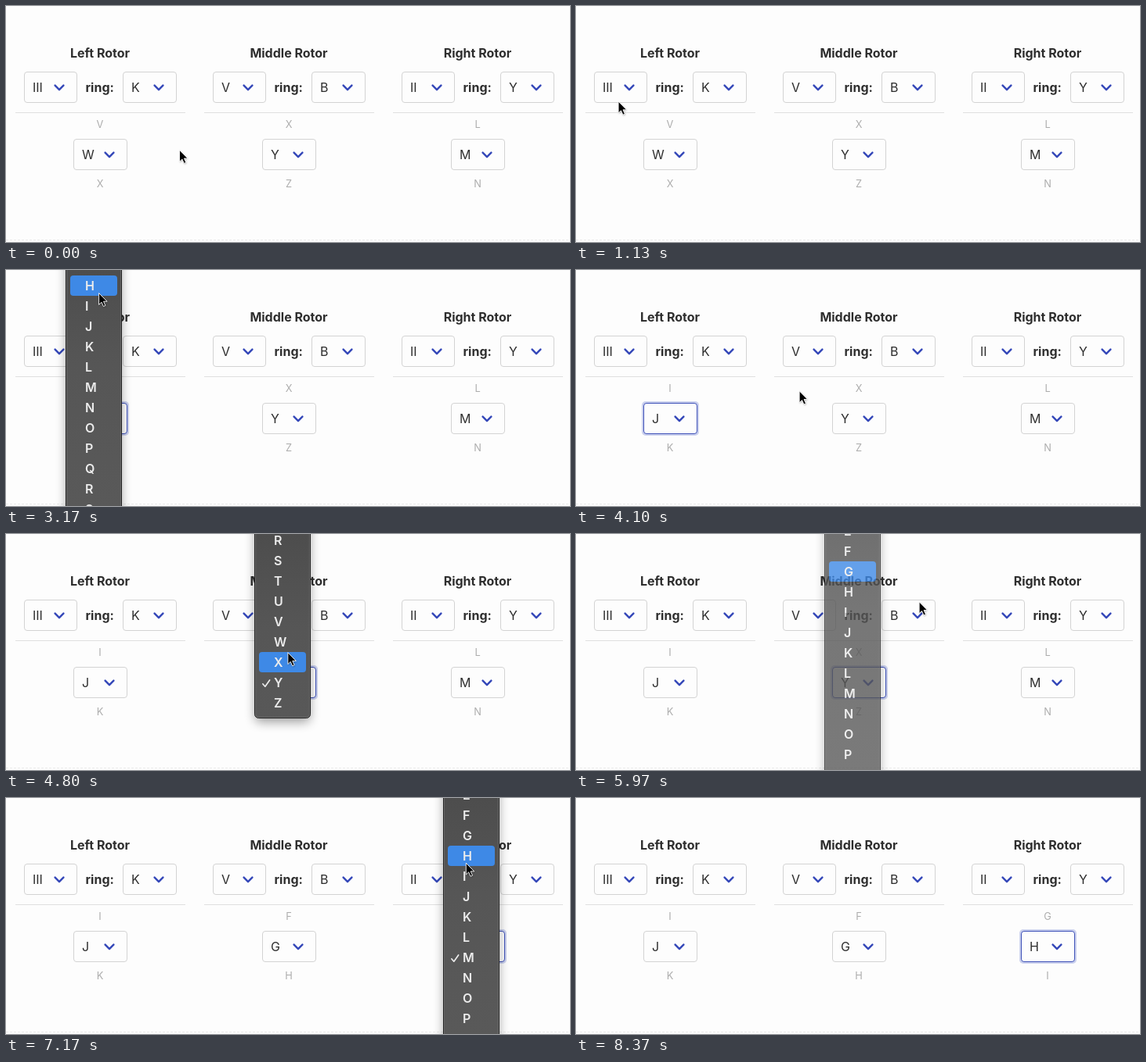
An HTML page for the animation above (8.46 s loop, 720 by 302 pixels).

```html
<!DOCTYPE html>
<html lang="en">
<head>
<meta charset="utf-8">
<title>Rotor settings</title>
<style>
  html, body { margin: 0; width: 100%; height: 100%; overflow: hidden; background: #fdfdfd; }
  svg { display: block; width: 100vw; height: 100vh; font: 16px Inter, "Liberation Sans", sans-serif; fill: #2e2e2e; }
  .bold { font-weight: 700; fill: #2e2e2e; }
  .small { font-size: 12.8px; fill: #adadad; text-anchor: middle; }
  .box { fill: #fdfdfd; stroke: #d3d3d3; }
  .focused .box { stroke: #3d50b8; }
  .halo { fill: #485fc7; opacity: 0; }
  .focused .halo { opacity: .28; }
  .chevron { fill: none; stroke: #3548b9; stroke-width: 2.5; stroke-linecap: round; stroke-linejoin: round; }
  .item { font-weight: 600; fill: #ececec; }
</style>
</head>
<body>
<svg id="stage" viewBox="0 0 720 302"></svg>
<script>
const LOOP = 8460, ROW = 26, PITCH = 241, FADE = 200;
const LETTERS = "ABCDEFGHIJKLMNOPQRSTUVWXYZ";
const stage = document.getElementById("stage");

const rotors = [
  { title: "Left Rotor", type: "III", ring: "K", from: "W", to: "J" },
  { title: "Middle Rotor", type: "V", ring: "B", from: "Y", to: "G" },
  { title: "Right Rotor", type: "II", ring: "Y", from: "M", to: "H" }
];

const menus = [
  { open: 1470, pick: 3480, fade: 3570, scroll: { start: 2670, end: 3050, by: 220 } },
  { open: 4430, pick: 5780, fade: 5930, scroll: { start: 4870, end: 5600, by: 326 } },
  { open: 6480, pick: 7540, fade: 7600, scroll: { start: 6780, end: 6950, by: 14 } }
];

// Pointer strokes: each eases from the previous end point, bowed by an optional bend.
const onSelect = i => [115 + 248 * i, 192];
const rest = [221, 184];
const strokes = [
  { start: 30, end: 150, to: [139, 198] },
  { start: 150, end: 530, to: [664, 102] },
  { start: 670, end: 1050, to: [38, 104] },
  { start: 1050, end: 1330, to: onSelect(0) },
  { start: 1470, end: 2240, to: [120, 9], bend: [26, 0] },
  { start: 3050, end: 3373, to: [114, 73] },
  { start: 3600, end: 4400, to: onSelect(1) },
  { start: 4656, end: 5070, to: [350, 48] },
  { start: 5800, end: 6240, to: onSelect(2), bend: [0, -11] },
  { start: 6730, end: 7241, to: [583, 77], bend: [12, 0] },
  { start: 8290, end: 8350, to: [647, 177] }
];

function progress({ start, end }, t) {
  const u = Math.min(1, Math.max(0, (t - start) / (end - start)));
  return u * u * (3 - 2 * u);
}

function pointerAt(t) {
  return strokes.reduce((p, s) => {
    const k = progress(s, t), bend = s.bend || [0, 0];
    return p.map((v, i) => v + (s.to[i] - v) * k + bend[i] * 4 * k * (1 - k));
  }, rest);
}

const text = (x, y, str, attrs = "") => `<text x="${x}" y="${y}" ${attrs}>${str}</text>`;

function select(x, y, width, value, id = "") {
  return `<g id="${id}">
    <rect class="halo" x="${x - 2}" y="${y - 2}" width="${width + 4}" height="44" rx="5"/>
    <rect class="box" x="${x + .5}" y="${y + .5}" width="${width - 1}" height="39" rx="3.5"/>
    ${text(x + 11, y + 26, value)}
    <path class="chevron" d="M${x + width - 28.4} ${y + 17.7}l5.4 5.4 5.4-5.4"/></g>`;
}

function rotor(r, i) {
  return `<g transform="translate(${PITCH * i})">
    ${text(120, 66, r.title, 'class="bold" text-anchor="middle"')}
    ${select(23, 84, 68, r.type)}
    ${text(101.5, 110, "ring:", 'class="bold"')}
    ${select(149, 84, 69, r.ring)}
    <path d="M12 136.5H229" stroke="#e0e0e0"/>
    ${text(120, 156, "", `class="small" id="before${i}"`)}
    ${select(86, 170, 69, r.from, "select" + i)}
    ${text(120, 232, "", `class="small" id="after${i}"`)}</g>`;
}

const items = [...LETTERS].map((c, i) => text(25, i * ROW + 6, c, 'class="item"')).join("");

stage.innerHTML = `
  <defs>
    <linearGradient id="shade" gradientUnits="userSpaceOnUse" x1="0" y1="0" x2="0" y2="302">
      <stop offset="0" stop-color="#4d4d4d"/><stop offset=".4" stop-color="#565656"/><stop offset="1" stop-color="#595959"/>
    </linearGradient>
    <filter id="blur" filterUnits="userSpaceOnUse" x="-40" y="-60" width="160" height="430"><feGaussianBlur stdDeviation="7"/></filter>
    <filter id="soft" x="-50%" y="-50%" width="200%" height="200%"><feGaussianBlur stdDeviation="1"/></filter>
  </defs>
  <rect width="720" height="302" fill="#fdfdfd"/>
  <path d="M0 299.5H720" stroke="#e9e9e9" stroke-dasharray="3 2"/>
  ${rotors.map(rotor).join("")}
  <g id="menu">
    <rect id="shadow" x="1" y="-20" width="70" rx="5" opacity=".38" filter="url(#blur)" fill="#000"/>
    <rect id="panel" x=".5" y="-20" width="71" rx="5" fill="url(#shade)" stroke="#222"/>
    <rect id="rim" x="1.5" y="-20" width="69" rx="4" fill="none" stroke="#6a6a6a"/>
    <g id="list">
      <rect id="highlight" x="6" width="60" height="26" rx="4" fill="#3e89e6"/>
      ${items}
      <path id="check" d="M10.8 1.8l3 3.4 5.8-8.2" fill="none" stroke="#ececec" stroke-width="1.7" stroke-linecap="round" stroke-linejoin="round"/>
    </g>
  </g>
  <g id="pointer">
    <path d="M1 1.5V16.5L4.5 13 7 18.5 9.5 17.3 7 12H11.5Z" opacity=".35" fill="#000" filter="url(#soft)"/>
    <path d="M.5 .3V15.2L3.9 12 6.3 17.4 8.8 16.3 6.4 11H11Z" fill="#000" stroke="#fff" stroke-width=".9"/>
  </g>`;

const el = id => document.getElementById(id);
const set = (id, name, value) => el(id).setAttribute(name, value);

function drawRotors(t) {
  const focus = menus.filter(m => t >= m.open).length - 1;
  rotors.forEach((r, i) => {
    const value = t >= menus[i].fade + 150 ? r.to : r.from;
    const n = LETTERS.indexOf(value);
    el("before" + i).textContent = LETTERS[(n + 25) % 26];
    el("after" + i).textContent = LETTERS[(n + 1) % 26];
    el("select" + i).querySelector("text").textContent = value;
    set("select" + i, "class", i === focus ? "focused" : "");
  });
}

function drawMenu(t, pointerY) {
  const i = menus.findIndex(m => t >= m.open && t < m.fade + FADE);
  set("menu", "display", i < 0 ? "none" : "inline");
  if (i < 0) return;
  const m = menus[i], r = rotors[i];
  const checked = LETTERS.indexOf(r.from);
  const top = 190 - checked * ROW + m.scroll.by * progress(m.scroll, t);
  const hovered = t >= m.pick ? LETTERS.indexOf(r.to) : Math.floor((pointerY - top) / ROW + .5);
  const bottom = Math.min(top + 25 * ROW + 19.5, 330);
  set("menu", "transform", `translate(${76 + PITCH * i})`);
  set("menu", "opacity", 1 - Math.max(0, t - m.fade) / FADE);
  set("panel", "height", bottom + 20);
  set("rim", "height", bottom + 19);
  set("shadow", "height", bottom + 25);
  set("list", "transform", `translate(0 ${top})`);
  set("highlight", "y", (hovered - .5) * ROW);
  set("check", "transform", `translate(0 ${checked * ROW})`);
}

function draw(t) {
  const pointer = pointerAt(t);
  drawRotors(t);
  drawMenu(t, pointer[1]);
  set("pointer", "transform", `translate(${pointer})`);
  set("pointer", "display", t < 8370 ? "inline" : "none");
}

const start = performance.now();
function tick() {
  draw((performance.now() - start) % LOOP);
  requestAnimationFrame(tick);
}
tick();
</script>
</body>
</html>
```
